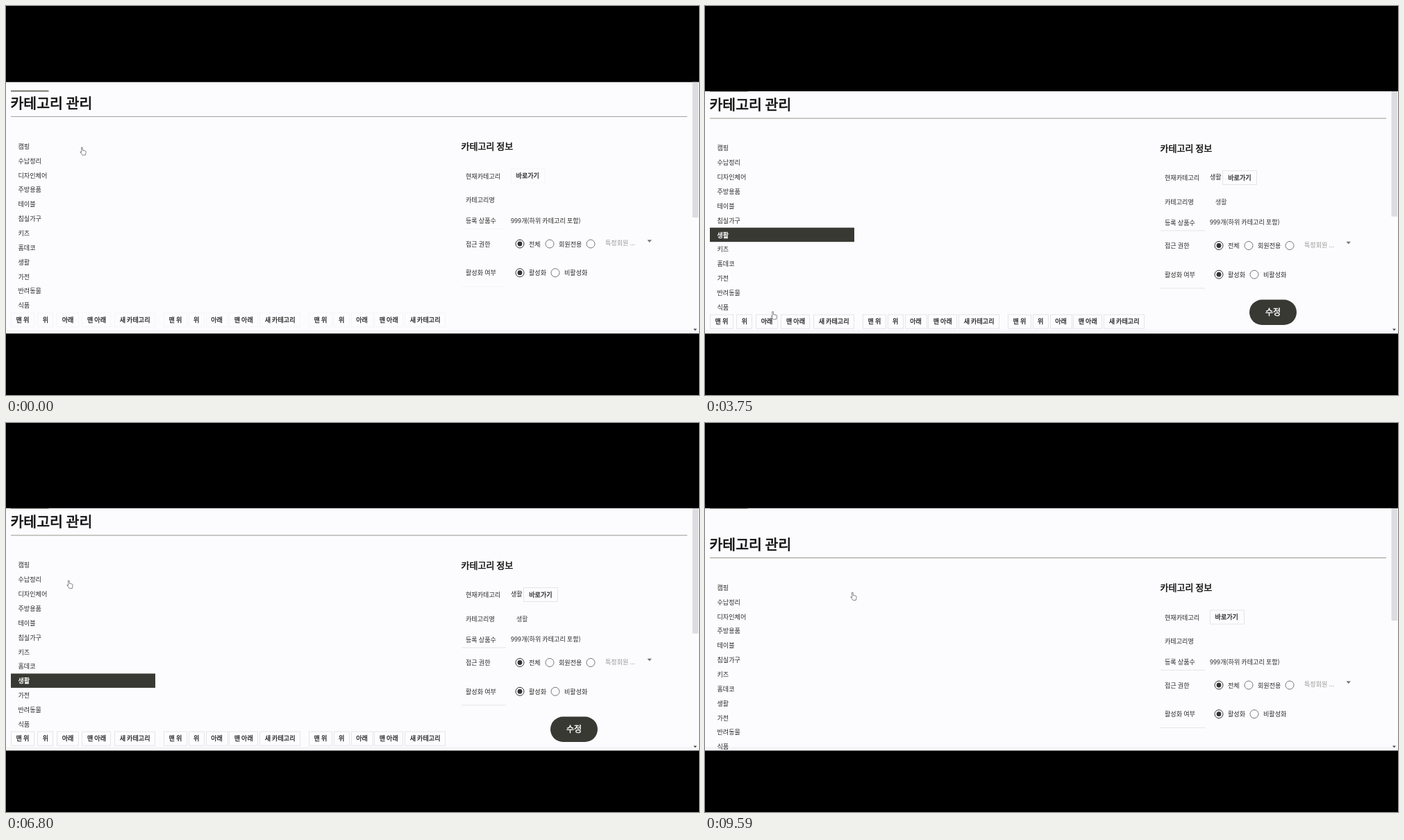
An HTML page with a canvas for the animation above (9.63 s loop, 998 by 561 pixels).

```html
<!DOCTYPE html>
<html lang="ko">
<head>
<meta charset="utf-8">
<style>
  html, body { margin: 0; width: 100%; height: 100%; overflow: hidden; background: #000; }
  canvas { display: block; }
</style>
</head>
<body>
<canvas id="stage" width="998" height="561"></canvas>
<script>
const g = document.getElementById('stage').getContext('2d');
const LOOP = 9630, RELOAD = 2400, SECOND = 3050, RESET = 9300;
const INK = '#292929', DARK = '#393934', PAPER = '#fcfcfe';
const ROW = 20.86, FIRST_ROW = 202.5, BUTTON_ROW = 452.6;
const COLUMNS = [{ x: 7, w: 208 }, { x: 227, w: 197 }, { x: 436, w: 197 }];
const BUTTONS = ['맨 위', '위', '아래', '맨 아래', '새 카테고리'];
const MAIN = '캠핑 수납정리 디자인체어 주방용품 테이블 침실가구 키즈 홈데코 생활 가전 반려동물 식품'.split(' ');
const CHILDREN = {
  수납정리: ['옷장/행거', '정리', '수납'],
  수납: ['서랍장', '조립식가구', '거실장', '진열장'],
};
const TYPED = 'ㅋ 캐 캠 캠ㅍ 캠피 캠핑 캠핑ㅇ 캠핑으 캠핑의 캠핑의ㅈ 캠핑의자'.split(' ');

const ease = p => p * p * (3 - 2 * p);
const clamp = v => Math.max(0, Math.min(1, v));

function setFont(size) {
  g.font = `${size}px "Noto Sans CJK KR", "Noto Sans CJK", "Noto Sans CJK JP", sans-serif`;
}

// Each row of buttons is justified to its column
setFont(9.1);
const labelWidths = BUTTONS.map(label => g.measureText(label).width + 15);
const buttonBoxes = COLUMNS.map(({ x, w }) => {
  const gap = (w - labelWidths.reduce((a, b) => a + b)) / (BUTTONS.length - 1);
  return labelWidths.map(width => {
    const box = { x, w: width };
    x += width + gap;
    return box;
  });
});

function scrollAt(t) {
  if (t < RELOAD) return 0;
  if (t < SECOND || t >= RESET) return 35;
  return 35 - 32.5 * ease(clamp((t - 3130) / 180));
}

// The script: where the pointer arrives, when, and what its click does
const steps = [], preview = {};
const point = (x, y) => [x, y];
const onRow = (t, col, i, dx = 0) =>
  [COLUMNS[col].x + COLUMNS[col].w / 2 + dx, FIRST_ROW + 7 + ROW * i + scrollAt(t)];
const onButton = (t, col, i) => {
  const { x, w } = buttonBoxes[col][i];
  return [x + w / 2 + 7, BUTTON_ROW + 6 + scrollAt(t)];
};

function at(t, [x, y], act = () => {}, jump = false) {
  steps.push({ t, x, y, act, jump });
  act(preview);
}
function reset(s) {
  s.lists = [[...MAIN], [], []];
  s.sel = [];
  s.adding = false;
}
function add(s) {
  s.lists[1] = ['새 카테고리'];
  s.sel[1] = '새 카테고리';
  s.adding = true;
}
function pick(t, col, name, { children = CHILDREN[name] || [], dx = 0 } = {}) {
  at(t, onRow(t, col, preview.lists[col].indexOf(name), dx), s => {
    s.sel = [...s.sel.slice(0, col), name];
    s.lists = [...s.lists.slice(0, col + 1), children, []].slice(0, 3);
  });
}
function press(t, by) {
  const dir = Math.sign(by);
  for (let n = 0; n < Math.abs(by); n++) {
    const time = t + n * 80;
    at(time, onButton(time, 0, dir < 0 ? 1 : 2), s => {
      const list = s.lists[0], i = list.indexOf(s.sel[0]);
      [list[i], list[i + dir]] = [list[i + dir], list[i]];
    });
  }
}
function shift(t, name, by) {
  pick(t, 0, name);
  press(t + 140, by);
}

at(0, onRow(0, 0, 0), reset);
pick(260, 0, '캠핑');
at(700, onButton(700, 1, 4), add);
at(1020, point(760, 283));
at(1220, point(640, 283));
at(1980, point(640, 283));
at(2200, point(818, 442));
at(RELOAD, point(818, 442), reset);
pick(2780, 0, '캠핑', { children: ['캠핑의자'], dx: 39 });
at(SECOND, point(214, 250), reset, true);
shift(3430, '생활', -2);
shift(3900, '식품', -5);
shift(4400, '주방용품', 2);
press(4820, -2);
shift(5200, '식품', 5);
shift(5850, '생활', 2);
at(6800, onRow(6800, 0, 1, -19));
pick(6920, 0, '수납정리', { dx: -19 });
pick(7300, 1, '수납');
pick(7750, 2, '서랍장');
at(8350, point(600, 490));
at(RESET, point(214, 250), reset, true);

function pointerAt(t) {
  const i = steps.findLastIndex(s => s.t <= t);
  const from = steps[i], to = steps[i + 1];
  if (!to || to.jump) return [from.x, from.y];
  const p = ease(clamp((t - from.t) / (to.t - from.t) / 0.6));
  return [from.x + (to.x - from.x) * p, from.y + (to.y - from.y) * p];
}

function rect(x, y, w, h, color) {
  g.fillStyle = color;
  g.fillRect(x, y, w, h);
}

// y is the visual middle of the glyphs; medium thickens the regular weight
function text(str, x, y, { size = 9.1, medium = false, color = INK, align = 'left' } = {}) {
  setFont(size);
  g.fillStyle = g.strokeStyle = color;
  g.textAlign = align;
  g.fillText(str, x, y + size * 0.37);
  if (medium) {
    g.lineWidth = size * 0.036;
    g.strokeText(str, x, y + size * 0.37);
  }
  return g.measureText(str).width;
}

function shape(points, fill, stroke) {
  g.beginPath();
  points.forEach(([x, y]) => g.lineTo(x, y));
  g.closePath();
  g.fillStyle = fill;
  g.fill();
  if (stroke) {
    g.strokeStyle = stroke;
    g.lineWidth = 0.8;
    g.stroke();
  }
}

function button(label, x, y, w, border) {
  g.strokeStyle = border;
  g.lineWidth = 1;
  g.strokeRect(Math.round(x) + 0.5, y - 10, Math.round(w) - 1, 20);
  text(label, x + w / 2, y, { medium: true, align: 'center' });
}

function radio(label, x, y, on) {
  g.beginPath();
  g.arc(x, y, 6, 0, 7);
  g.strokeStyle = on ? '#333' : '#777';
  g.lineWidth = 1;
  g.stroke();
  if (on) {
    g.beginPath();
    g.arc(x, y, 3.4, 0, 7);
    g.fillStyle = '#333';
    g.fill();
  }
  text(label, x + 13, y + 0.2);
}

function drawLists(s, [px, py]) {
  s.lists.forEach((list, col) => list.forEach((name, i) => {
    const { x, w } = COLUMNS[col], y = FIRST_ROW + ROW * i;
    const selected = s.sel[col] === name;
    const hover = px > x && px < x + w && Math.abs(py - y) < ROW / 2;
    if (selected) rect(x, y - 10.5, w, 20.5, hover ? '#6c6c6c' : DARK);
    text(name, x + 10.5, y, selected ? { medium: true, color: '#fff' } : {});
  }));
}

function drawNameInput(t) {
  rect(727, 269, 247, 20, '#f3f6f6');
  rect(727, 289, 247, 1.4, '#55555f');
  const step = Math.floor((t - 1220) / 68);
  const typed = step < 0 ? '' : TYPED[Math.min(step, TYPED.length - 1)];
  const w = text(typed, 735, 280);
  if (typed) rect(735 + w - 8.4, 285, 8.4, 0.8, INK);
  rect(735 + w, 274, 0.9, 12, INK);
}

function drawForm(s, t, border) {
  const current = s.sel[s.sel.length - 1];
  text(s.adding ? '새 카테고리 추가' : '카테고리 정보', 655.5, 202.5, { size: 13, medium: true, color: '#111' });

  text('현재카테고리', 662, 245.3);
  const nameWidth = current ? text(current, 727, 244.3) + 2 : 0;
  button('바로가기', 726.5 + nameWidth, 245, 49.5, border);

  text('카테고리명', 662, 280);
  if (s.adding && t > 1020) drawNameInput(t);
  else if (current && !s.adding) text(current, 735, 280, { color: '#444' });

  text('등록 상품수', 662, 309.8);
  text('999개(하위 카테고리 포함)', 727, 309.5);
  rect(656, 321, 64, 1, border);

  text('접근 권한', 662, 343.2);
  radio('전체', 740, 343, true);
  radio('회원전용', 783, 343);
  radio('', 842, 343);
  text('특정회원 ...', 863, 342, { color: '#999' });
  shape([[923.5, 337.3], [930, 337.3], [926.7, 341]], '#777');

  text('활성화 여부', 662, 385);
  radio('활성화', 740, 384.7, true);
  radio('비활성화', 791, 384.7);
  rect(656, 404, 64, 1, border);

  if (current) {
    g.beginPath();
    g.roundRect(784, 421, 68, 36.5, 18.2);
    g.fillStyle = DARK;
    g.fill();
    text(s.adding ? '등록' : '수정', 818, 439.3, { size: 12, medium: true, color: '#fff', align: 'center' });
  }
}

function drawPointer(x, y) {
  const hand = x < 633 || y > 420;
  const outline = hand
    ? [[-2.5, -5.5], [-1, -5.8], [-0.5, -1.5], [3.5, -0.5], [4.2, 1], [3.4, 5.5], [-1, 5.5], [-4.2, 0.8], [-2, 1.2]]
    : [[-1.5, -5], [-1.5, 4], [0.2, 2.6], [1.4, 5], [2.6, 4.5], [1.6, 2], [4, 2]];
  shape(outline.map(([dx, dy]) => [x + dx, y + dy]), '#fff', '#666');
}

function draw() {
  const t = performance.now() % LOOP;
  const state = {};
  steps.forEach(s => s.t <= t && s.act(state));
  const second = t >= SECOND, top = second ? 123 : 109.5;
  const border = second ? '#e5e5e8' : '#f5f5f8';
  const scroll = scrollAt(t), pointer = pointerAt(t);

  rect(0, 0, 998, 561, '#000');
  g.save();
  g.beginPath();
  g.rect(0, top, 998, 472.3 - top);
  g.clip();
  rect(0, top, 998, 363, PAPER);
  rect(0, 467, 998, 6, '#f5f5f7');
  rect(988.5, top, 8.5, 305 - scroll * 0.57 - top, '#dddde1');
  shape([[990, 465.5], [995, 465.5], [992.5, 468.3]], '#444');
  rect(7, 121.6, 54.5, 2, '#77776f');

  g.save();
  g.translate(0, scroll);
  text('카테고리 관리', 6.5, 140.3, { size: 20.5, medium: true, color: '#111' });
  rect(7, 159, 974, 1, second ? '#96968e' : scroll ? '#b9b9dc' : '#a2a2a6');
  drawLists(state, [pointer[0], pointer[1] - scroll]);
  buttonBoxes.forEach(boxes => boxes.forEach(({ x, w }, i) => button(BUTTONS[i], x, BUTTON_ROW, w, border)));
  drawForm(state, t, border);
  g.restore();

  drawPointer(...pointer);
  g.restore();
  requestAnimationFrame(draw);
}
draw();
</script>
</body>
</html>
```
